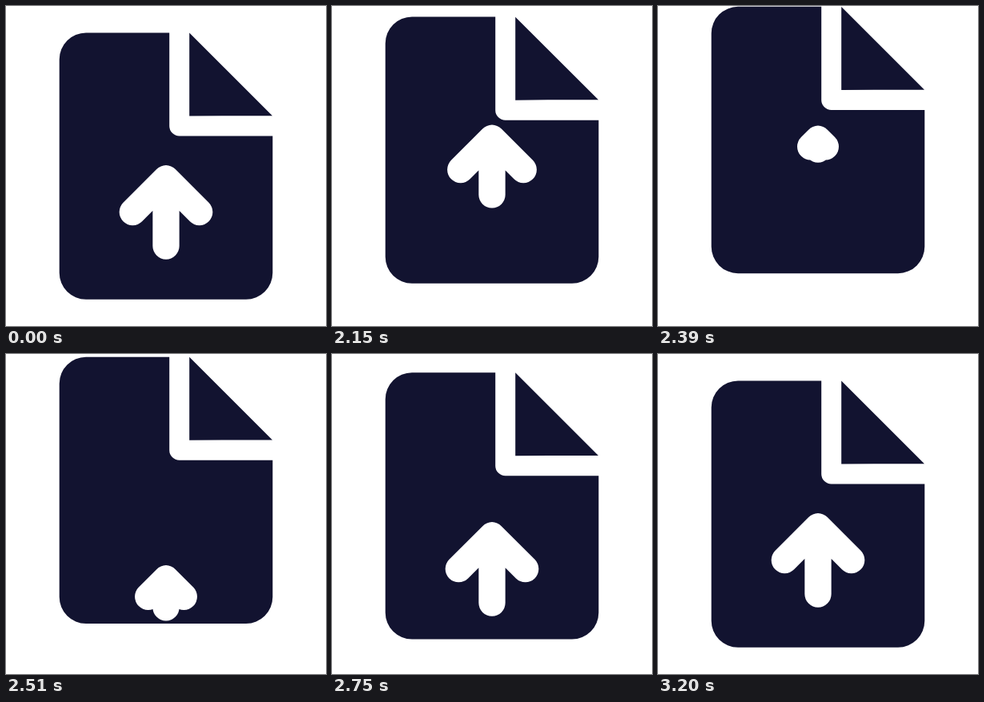
These frames come from a looping animation (400 by 400 pixels, 3.23 s). An HTML page:

```html
<!DOCTYPE html>
<html lang="en">
<head>
<meta charset="utf-8">
<title>Upload file</title>
<style>
  html, body { margin: 0; width: 100%; height: 100%; overflow: hidden; background: #fff; }
  svg { display: block; width: 100vw; height: 100vh; }
</style>
</head>
<body>
<svg viewBox="0 0 400 400">
  <g id="page" fill="#121330">
    <path d="M100 33.4H204.2V150A12.5 12.5 0 0 0 216.7 162.5H333.3V333.4A33.3 33.3 0 0 1 300 366.7H100A33.3 33.3 0 0 1 66.7 333.4V66.7A33.3 33.3 0 0 1 100 33.4Z"/>
    <path d="M229.2 33.5L333 137.2L270 137.2L229.2 137.5Z"/>
    <path id="arrow" fill="none" stroke="#fff" stroke-width="33.3" stroke-linecap="round" stroke-linejoin="round"/>
  </g>
</svg>
<script>
const LOOP = 3230;
const START = 2010, TOP = 2410, SWAP = 2430, DROP = 2437, DROP_MS = 780, GROW_MS = 220;
const LIFT = 32.6;
const TIP = 215.8, STEM = 84.2, ARM = 41.7, PIVOT = 273;

const page = document.getElementById('page');
const arrow = document.getElementById('arrow');
const clamp = x => Math.min(1, Math.max(0, x));

// cubic-bezier(.25, .1, .25, 1), solved by bisection
function ease(x) {
  x = clamp(x);
  if (x === 0 || x === 1) return x;
  let lo = 0, hi = 1, s = 0.5;
  for (let i = 0; i < 24; i++) {
    s = (lo + hi) / 2;
    if (0.75 * s * (1 - s) + s ** 3 < x) lo = s; else hi = s;
  }
  return 0.3 * s * (1 - s) ** 2 + 3 * s * s * (1 - s) + s ** 3;
}

function draw(t) {
  const rise = ease((t - START) / (TOP - START));
  const fall = ease((t - DROP) / DROP_MS);
  let shift, stem, arm;
  if (t < SWAP) {
    // the arrow leaves upwards and contracts
    const u = clamp((t - START) / (SWAP - START));
    shift = -65.5 * rise;
    stem = 1 - u ** 1.67;
    arm = 1 - u ** 2.6;
  } else {
    // it returns from below and unfolds
    const v = 1 - clamp((t - DROP) / GROW_MS);
    shift = 68 * (1 - fall);
    stem = 1 - v ** 1.35;
    arm = 1 - v ** 1.87;
  }
  const tip = PIVOT + (TIP - PIVOT) * stem + shift;
  const end = tip + STEM * stem;
  const a = ARM * arm;
  page.setAttribute('transform', `translate(0 ${-LIFT * rise * (1 - fall)})`);
  arrow.setAttribute('d',
    `M${200 - a} ${tip + a}L200 ${tip}L${200 + a} ${tip + a}M200 ${tip}V${end}`);
}

const begin = performance.now();
function frame() {
  draw((performance.now() - begin) % LOOP);
  requestAnimationFrame(frame);
}
draw(0);
requestAnimationFrame(frame);
</script>
</body>
</html>
```
